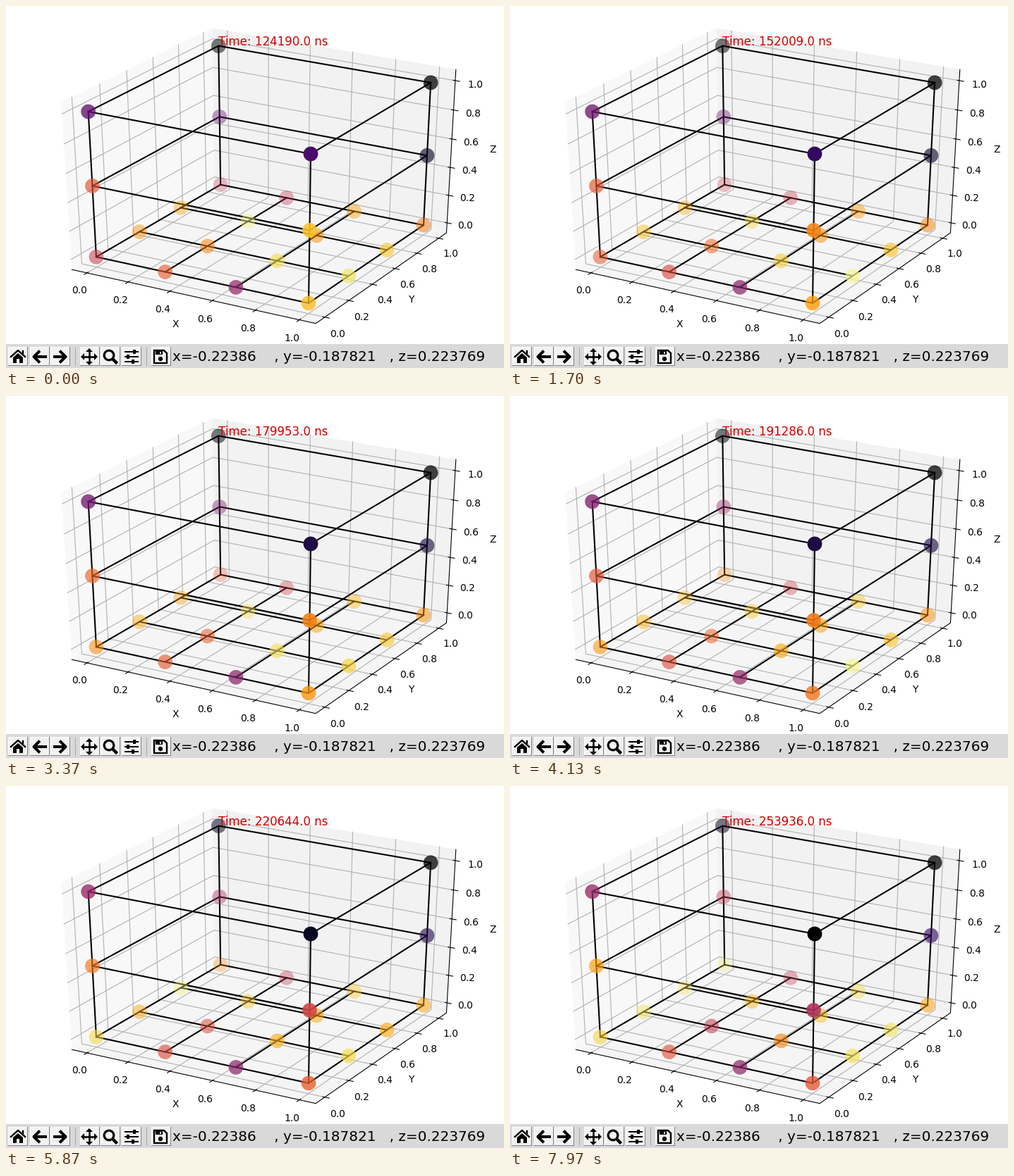
Animation of 706x514 px, one loop 8 s. Source, as a matplotlib script:

```python
import itertools

import numpy as np
import matplotlib
import matplotlib.pyplot as plt
from matplotlib.animation import FuncAnimation
from matplotlib.collections import LineCollection
from matplotlib.patches import Circle, Polygon, Rectangle

W, H, DPI = 706, 514, 100
FRAMES, LOOP = 240, 8000
PX = 72 / DPI

plt.rcParams["font.family"] = "DejaVu Sans"
fig = plt.figure(figsize=(W / DPI, H / DPI), dpi=DPI, facecolor="white")
ax = fig.add_axes([0, 0, 1, 1])
ax.set_xlim(0, W)
ax.set_ylim(H, 0)
ax.axis("off")

# Screen places of the box corners fix the perspective.
CORNERS = {
    (0, 0, 0): (128, 356), (1, 0, 0): (429, 422),
    (0, 1, 0): (304, 254), (1, 1, 0): (592, 311),
    (0, 0, 1): (116.5, 150), (1, 0, 1): (432, 210),
    (0, 1, 1): (301.5, 56.5), (1, 1, 1): (602, 109),
    (0, 0, .5): (122.5, 255.5), (1, 1, .5): (597, 212),
}


def fit_camera(points):
    rows, rhs = [], []
    for p, (u, v) in points.items():
        q = np.array([*p, 1.0])
        zero = np.zeros(4)
        rows += [np.r_[q, zero, -u * q[:3]], np.r_[zero, q, -v * q[:3]]]
        rhs += [u, v]
    sol = np.linalg.lstsq(np.array(rows), np.array(rhs), rcond=None)[0]
    return np.r_[sol, 1].reshape(3, 4)


CAMERA = fit_camera(CORNERS)


def project(points):
    pts = np.array(points, float)
    q = np.c_[pts, np.ones(len(pts))] @ CAMERA.T
    return q[:, :2] / q[:, 2:]


def strokes(paths, color, width, z):
    ax.add_collection(LineCollection(paths, colors=color, linewidths=width * PX,
                                     zorder=z, capstyle="projecting"))


def strokes3d(paths, color, width, z):
    strokes([project(p) for p in paths], color, width, z)


def shape(points, color, z):
    ax.add_patch(Polygon(points, closed=True, fc=color, ec="none", zorder=z))


def label(x, y, s, size, color="black", ha="center"):
    return ax.text(x, y, s, fontsize=size, color=color, ha=ha,
                   va="baseline", zorder=9)


# Panes, grid, axes and ticks
LO, HI = -.074, 1.074
TICKS = np.linspace(0, 1, 6)


def tick_labels(points, first, last):
    p = project(points)
    mix = np.linspace(0, 1, len(p))[:, None]
    p = p + (1 - mix) * (first - p[0]) + mix * (last - p[-1])
    for (x, y), t in zip(p, TICKS):
        label(x, y + 4.5, f"{t:.1f}", 10)


def draw_axes():
    quad = [(LO, LO), (HI, LO), (HI, HI), (LO, HI)]
    shape(project([(LO, a, b) for a, b in quad]), "#f8f8f8", 1)
    shape(project([(a, HI, b) for a, b in quad]), "#f2f2f2", 1)
    shape(project([(a, b, LO) for a, b in quad]), "#f5f5f5", 1)
    grid, marks = [], []
    for t in TICKS:
        grid += [[(t, LO, LO), (t, HI, LO), (t, HI, HI)],
                 [(HI, t, LO), (LO, t, LO), (LO, t, HI)],
                 [(LO, LO, t), (LO, HI, t), (HI, HI, t)]]
        marks += [[(t, LO + .01, LO), (t, LO - .02, LO)],
                  [(HI - .01, t, LO), (HI + .02, t, LO)],
                  [(HI - .01, HI, t), (HI + .02, HI, t)]]
    strokes3d(grid, "#b0b0b0", 1.1, 2)
    strokes3d(marks, "black", 1.1, 3)
    strokes3d([[(LO, LO, LO), (HI, LO, LO), (HI, HI, LO), (HI, HI, HI)]],
              "black", 1.1, 3)
    tick_labels([(t, LO, LO) for t in TICKS], (104, 404), (405.5, 472))
    tick_labels([(HI, t, LO) for t in TICKS], (470.5, 465), (630.5, 352))
    tick_labels([(HI, HI, t) for t in TICKS], (651.5, 311), (665, 111))
    label(240, 456, "X", 10)
    label(574, 421, "Y", 10)
    label(690, 208, "Z", 10)


# The wire box with its 4 x 4 floor mesh
def draw_wires():
    ring = [(0, 0), (1, 0), (1, 1), (0, 1), (0, 0)]
    wires = [[(x, y, z) for x, y in ring] for z in (.5, 1)]
    wires += [[(x, y, 0), (x, y, 1)] for x, y in ring[:4]]
    for a in np.arange(4) / 3:
        wires += [[(a, 0, 0), (a, 1, 0)], [(0, a, 0), (1, a, 0)]]
    strokes3d(wires, "black", 2.08, 4)


# Toolbar
def button(x):
    ax.add_patch(Rectangle((x, 484), 28, 27, fc="#828282", zorder=7))
    ax.add_patch(Rectangle((x, 484), 27, 26, fc="white", zorder=7))
    ax.add_patch(Rectangle((x + 1, 485), 26, 25, fc="#f2f2f2", zorder=7))


def draw_toolbar():
    ink = "black"
    ax.add_patch(Rectangle((0, 480), W, 34, fc="#d9d9d9", zorder=6))
    for x in (3, 34, 63, 105, 134, 164, 206):
        button(x)
    strokes([[(x, 485), (x, 510)] for x in (97.5, 198.5)], "#a8a8a8", 1, 7)
    # home
    strokes([[(7, 498), (17, 489), (27, 498)], [(23.5, 489.5), (23.5, 493)]],
            ink, 2.4, 8)
    shape([(10, 499), (17, 493), (24, 499), (24, 507), (19, 507), (19, 501),
           (15, 501), (15, 507), (10, 507)], ink, 8)
    # back and forward
    for x, d in ((47.5, -1), (76.5, 1)):
        strokes([[(x - 8 * d, 498), (x + 7 * d, 498)],
                 [(x + d, 491), (x + 8 * d, 498), (x + d, 505)]], ink, 4, 8)
    # pan
    cx, cy = 118, 498
    strokes([[(cx - 8, cy), (cx + 8, cy)], [(cx, cy - 8), (cx, cy + 8)]],
            ink, 2.6, 8)
    for dx, dy in ((1, 0), (-1, 0), (0, 1), (0, -1)):
        shape([(cx + 12 * dx, cy + 12 * dy),
               (cx + 7 * dx + 5 * dy, cy + 7 * dy + 5 * dx),
               (cx + 7 * dx - 5 * dy, cy + 7 * dy - 5 * dx)], ink, 8)
    # zoom
    ax.add_patch(Circle((146, 496), 6.8, fc="none", ec=ink, lw=3.2 * PX,
                        zorder=8))
    strokes([[(152, 502), (156, 506)]], ink, 4.4, 8)
    # sliders
    for y, x in ((491, 182), (498, 173), (505, 180)):
        strokes([[(169, y), (187, y)]], ink, 2, 8)
        ax.add_patch(Rectangle((x - 2, y - 2.8), 4, 5.6, fc=ink, zorder=8))
    # save
    ax.add_patch(Polygon([(210, 489), (224, 489), (228, 493), (228, 507),
                          (210, 507)], fc="none", ec=ink, lw=2.4 * PX,
                         zorder=8))
    ax.add_patch(Rectangle((212, 490), 10, 5, fc=ink, zorder=8))
    ax.add_patch(Rectangle((218, 491), 2, 3, fc="white", zorder=8))
    ax.add_patch(Circle((219, 501), 3.2, fc=ink, zorder=8))
    label(236, 504, "x=-0.22386    , y=-0.187821   , z=0.223769", 14.4,
          ha="left")


# Each sensor drifts from one level to another and wavers on the way.
NODES = np.array(
    [(x / 3, y / 3, 0) for y, x in itertools.product(range(4), repeat=2)]
    + [(x, y, z) for z in (.5, 1) for y in (0, 1) for x in (0, 1)])
BEGIN = np.array([.57, .63, .39, .84, .76, .76, .95, .93,
                  .75, .96, .74, .85, .48, .52, .82, .71,
                  .58, .86, .27, .06, .28, .22, 0, 0])
FINAL = np.array([.93, .60, .37, .60, .90, .53, .77, .90,
                  .98, .82, .83, .88, .90, .55, .92, .83,
                  .74, .47, .48, .17, .42, 0, .05, 0])
ALPHA = np.clip(.56 + NODES @ [.22, -.26, .22], 0, 1)
CMAP = matplotlib.colormaps["inferno"]
rng = np.random.default_rng(4)
SPEED = rng.uniform(3, 9, (2, len(NODES)))
PHASE = rng.uniform(0, 2 * np.pi, (2, len(NODES)))


def levels(s):
    waver = np.sin(2 * np.pi * SPEED * s + PHASE).sum(axis=0)
    drift = BEGIN + (FINAL - BEGIN) * s
    return np.clip(drift * (1 + .04 * waver), 0, .98)


# Simulated clock: readings at a few key frames, even pace between
CLOCK = {0: 124190, 32: 142054, 73: 163536, 101: 179953, 148: 204165,
         176: 220644, 239: 253936}

draw_axes()
draw_wires()
draw_toolbar()
dots = ax.scatter(*project(NODES).T, s=(20.8 * PX) ** 2, linewidths=0, zorder=5)
clock = label(301.3, 56, "", 12, color="#d40000", ha="left")


def update(i):
    colors = CMAP(levels(i / FRAMES))
    colors[:, 3] = ALPHA
    dots.set_facecolors(colors)
    now = np.interp(i, list(CLOCK), list(CLOCK.values()))
    clock.set_text(f"Time: {now:.0f}.0 ns")
    return dots, clock


anim = FuncAnimation(fig, update, frames=FRAMES, interval=LOOP / FRAMES,
                     repeat=True, repeat_delay=0, blit=False)
plt.show()
```
